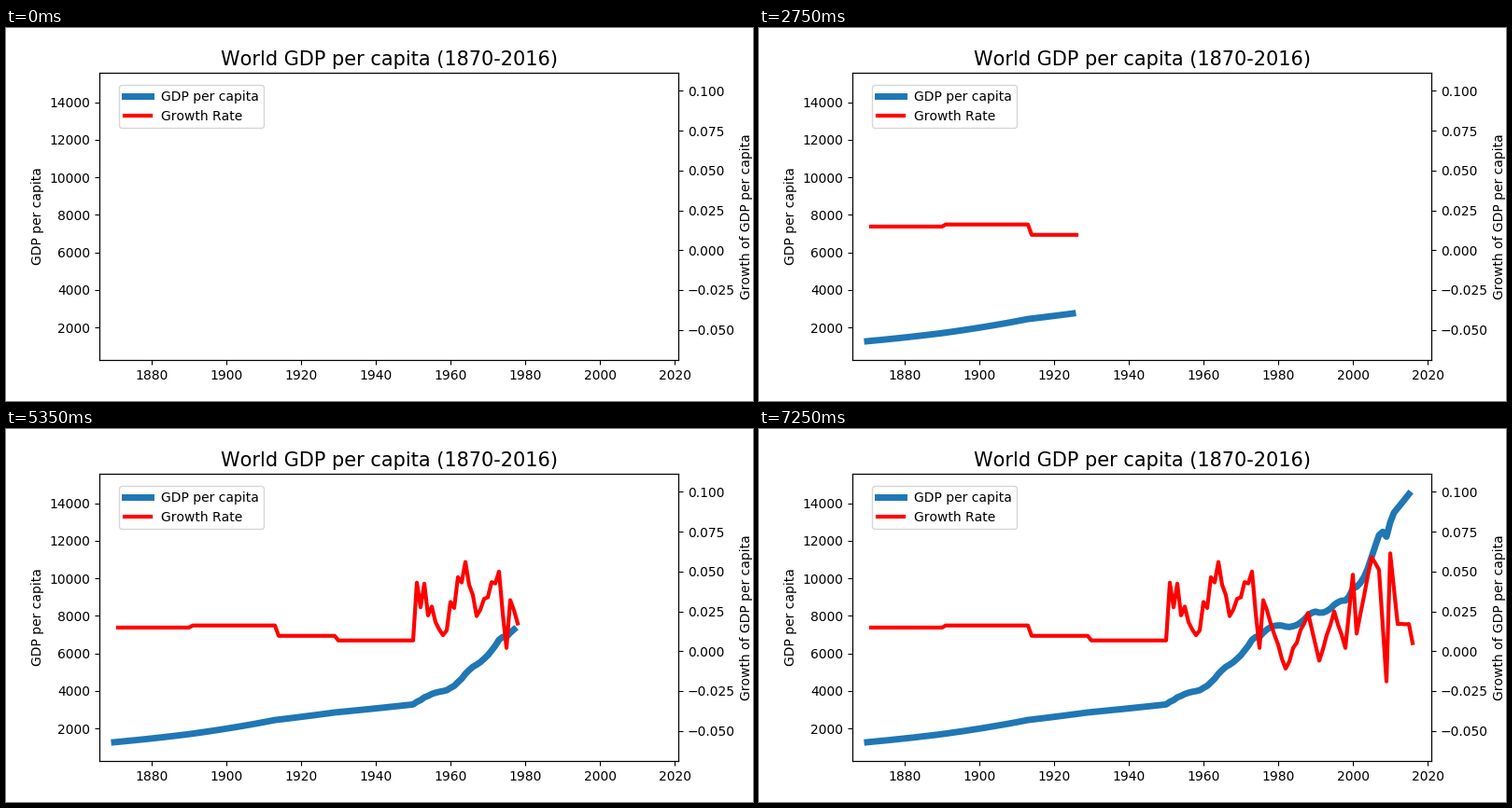
A matplotlib script that plays this animation: 800x400 px, repeating every 7.3 s.

```python
import numpy as np
import matplotlib.pyplot as plt
from matplotlib.animation import FuncAnimation

plt.rcParams["font.family"] = "DejaVu Sans"
plt.rcParams["text.kerning_factor"] = 6  # whole-pixel letter spacing

FRAMES, INTERVAL = 146, 50
years = np.arange(1870, 2017)

# Yearly growth in tenths of a percent: four plateaus, then swings between turns
PLATEAUS = [(20, 14.8), (23, 16.1), (16, 9.6), (21, 6.7)]
TURNS = {
    1951: 43, 1958: 10, 1964: 56, 1967: 22, 1973: 50, 1975: 2, 1976: 32,
    1982: -11, 1988: 24, 1991: -6, 1995: 25, 1998: 2, 2000: 48, 2001: 11,
    2005: 59, 2007: 51, 2009: -19, 2010: 61.4, 2012: 17, 2015: 17, 2016: 5,
}
GDP_ANCHORS = {1870: 1263, 1950: 3277, 1980: 7490, 1990: 8225,
               2000: 9460, 2009: 12220, 2016: 14574}


def make_growth():
    flat = np.concatenate([np.full(n, rate) for n, rate in PLATEAUS])
    turns = list(TURNS)
    late = np.arange(turns[0], turns[-1] + 1)
    age = late - turns[0]
    # short business cycle that fades out and leaves the turns in place
    ripple = 12 * np.exp(-age / 15) * np.cos(2 * np.pi * age / 2.2)
    ripple[np.isin(late, turns)] = 0
    swings = np.interp(late, turns, list(TURNS.values())) + ripple
    return np.concatenate([flat, swings]) / 1000


def make_gdp(growth):
    """Compound the growth, then bend the curve through the anchors."""
    log_gdp = np.concatenate([[0], np.cumsum(np.log1p(growth))])
    at = np.array(list(GDP_ANCHORS))
    gap = np.log(list(GDP_ANCHORS.values())) - log_gdp[at - years[0]]
    return np.exp(log_gdp + np.interp(years, at, gap))


growth = make_growth()
gdp = make_gdp(growth)

fig, ax = plt.subplots(figsize=(8, 4), dpi=100)
ax2 = ax.twinx()

ax.set_title("World GDP per capita (1870-2016)", fontsize=15)
ax.set_xlim(1866, 2021)
ax.set_ylim(gdp.min() - 1000, gdp.max() + 1000)
ax.set_ylabel("GDP per capita")
ax2.set_ylim(growth.min() - 0.05, growth.max() + 0.05)
ax2.set_ylabel("Growth of GDP per capita")

gdp_line, = ax.plot([], [], color="#1f77b4", lw=5, label="GDP per capita")
growth_line, = ax2.plot([], [], color="red", lw=3, label="Growth Rate")
fig.legend(handles=[gdp_line, growth_line], loc="upper left",
           bbox_to_anchor=(121.4 / 800, 1 - 61.2 / 400), borderaxespad=0)


def update(i):
    n = i + 1
    gdp_line.set_data(years[:n], gdp[:n])
    growth_line.set_data(years[1:n + 1], growth[:n])
    return gdp_line, growth_line


anim = FuncAnimation(fig, update, frames=FRAMES, interval=INTERVAL,
                     repeat=True, repeat_delay=0)
plt.show()
```
